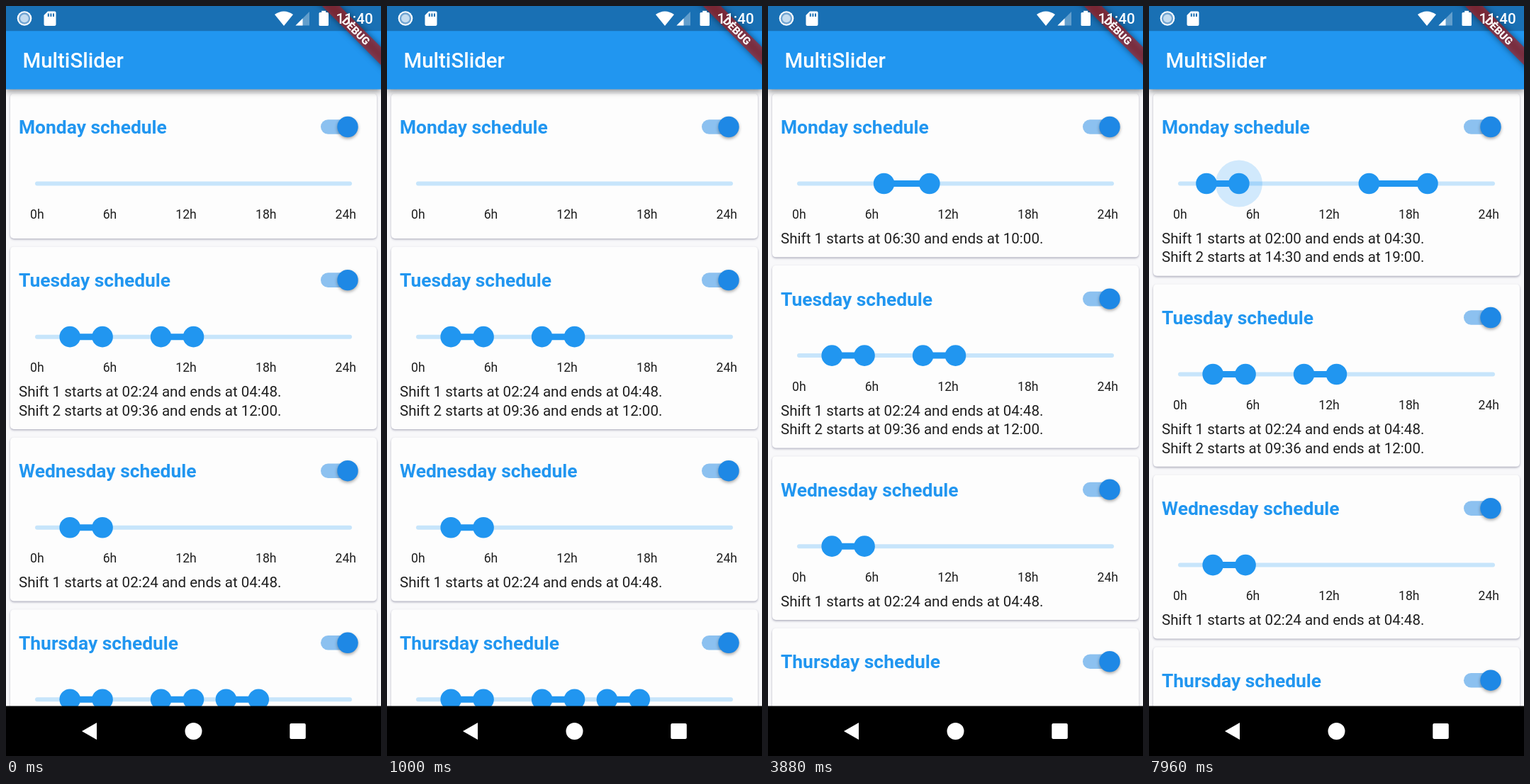
Recreate the animation shown at these times as an HTML page with a canvas. Size 529 px wide and 1058 px high, loop 8000 ms.

```html
<!DOCTYPE html>
<html lang="en">
<head>
<meta charset="utf-8">
<title>MultiSlider</title>
<style>
html, body { margin: 0; width: 100%; height: 100%; overflow: hidden; background: #fafafa; }
canvas { display: block; }
</style>
</head>
<body>
<canvas width="529" height="1058"></canvas>
<script>
const W = 529, LOOP = 8000;
const BLUE = '#2196f0', WHITE = '#fff', INK = '#1f1f1f';
const ctx = document.querySelector('canvas').getContext('2d');

const font = (size, weight = 400) => `${weight} ${size}px Roboto, sans-serif`;

function text(str, x, y, size, color, weight) {
  ctx.font = font(size, weight);
  ctx.fillStyle = color;
  ctx.fillText(str, x, y);
}

function rect(x, y, w, h, color, r = 0) {
  ctx.fillStyle = color;
  ctx.beginPath();
  ctx.roundRect(x, y, w, h, r);
  ctx.fill();
}

function circle(x, y, r, color) {
  ctx.fillStyle = color;
  ctx.beginPath();
  ctx.arc(x, y, r, 0, 7);
  ctx.fill();
}

function shape(path, color) {
  ctx.fillStyle = color;
  ctx.fill(new Path2D(path));
}

function shadowed(color, blur, dy, draw) {
  ctx.save();
  ctx.shadowColor = color;
  ctx.shadowBlur = blur;
  ctx.shadowOffsetY = dy;
  draw();
  ctx.restore();
}

// Each drag: which thumb moves, from when to when, how long it is held, and its hour stops.
const DRAGS = [
  { thumb: 1, press: 1900, release: 3450, stops: [[2000, 9], [2560, 14.5], [2680, 14.5], [3250, 10]] },
  { thumb: 0, press: 4080, release: 4950, stops: [[4180, 6.5], [4800, 2]] },
  { thumb: 2, press: 6000, release: 6850, stops: [[6100, 16.5], [6700, 14.5]] },
  { thumb: 1, press: 7150, release: 8001, stops: [[7250, 10], [7930, 4.5]] }
];
const ADDED = [[1450, 6.5, 9], [5260, 16.5, 19]];

const snap = h => Math.round(h * 2) / 2;

function along(stops, t) {
  let value = stops[0][1];
  for (let i = 1; i < stops.length; i++) {
    const [t0, a] = stops[i - 1], [t1, b] = stops[i];
    const p = Math.min(1, Math.max(0, (t - t0) / (t1 - t0)));
    value += (b - a) * p * p * (3 - 2 * p);
  }
  return snap(value);
}

function mondayAt(t) {
  const hours = ADDED.filter(a => t >= a[0]).flatMap(a => a.slice(1));
  let held = -1;
  for (const d of DRAGS) {
    if (t < d.press) break;
    hours[d.thumb] = along(d.stops, t);
    if (t < d.release) held = d.thumb;
  }
  return { hours, held };
}

const hourX = h => 44.3 + 18.35 * snap(h);

function clock(h) {
  const m = Math.round(h * 60);
  return [Math.floor(m / 60), m % 60].map(n => String(n).padStart(2, '0')).join(':');
}

function slider(hours, held, y) {
  rect(41, y - 3, 447, 6, '#c7e5fb', 3);
  for (let i = 0; i < hours.length; i += 2) {
    const x = hourX(hours[i]);
    rect(x, y - 4.5, hourX(hours[i + 1]) - x, 9, BLUE);
  }
  hours.forEach((h, i) => {
    if (i === held) circle(hourX(h), y, 33, 'rgba(33,150,243,.2)');
    circle(hourX(h), y, 14.8, BLUE);
  });
}

function toggle(y) {
  rect(444, y - 10.3, 48, 20.6, '#8cc1f0', 10.3);
  shadowed('rgba(0,0,0,.35)', 4, 2, () => circle(482, y, 14.7, '#1e88e5'));
}

function card(day, hours, held, top) {
  const height = 204.4 + hours.length / 2 * 26.45;
  shadowed('rgba(30,30,70,.35)', 3, 1.4, () => rect(6, top, 517, height, '#fdfdfd', 5));
  text(day + ' schedule', 18, top + 56.5, 26.4, BLUE, 700);
  toggle(top + 47);
  slider(hours, held, top + 127);
  [['0h', 34], ['6h', 136.7], ['12h', 239.3], ['18h', 352], ['24h', 464.5]]
    .forEach(([label, x]) => text(label, x, top + 176.5, 17.63, INK));
  for (let i = 0; i < hours.length; i += 2)
    text(`Shift ${i / 2 + 1} starts at ${clock(hours[i])} and ends at ${clock(hours[i + 1])}.`,
      18, top + 211.5 + i / 2 * 26.45, 20.57, INK);
  return top + height + 11.75;
}

function banner() {
  ctx.save();
  ctx.translate(W, 0);
  ctx.rotate(Math.PI / 4);
  ctx.filter = 'blur(5px)';
  rect(-70, 41.1, 140, 17.7, 'rgba(0,0,0,.5)');
  ctx.filter = 'none';
  rect(-70, 41.1, 140, 17.7, 'rgba(183,28,28,.627)');
  ctx.textAlign = 'center';
  text('DEBUG', 0, 55.3, 15, WHITE, 900);
  ctx.restore();
}

function statusIcons() {
  circle(26, 17.5, 10.3, WHITE);
  circle(26, 17.5, 8.2, '#72a5d2');
  circle(26, 17.5, 5.8, '#c4dcf0');
  shape('M59 7.5H68.5Q70.5 7.5 70.5 9.5V26Q70.5 28 68.5 28H55.5Q53.5 28 53.5 26V13Z', WHITE);
  [58.8, 62.4, 66].forEach(x => rect(x, 10.5, 2, 4.5, '#1970b4'));
  shape('M379 12Q392 3 405 12L392 28Z', WHITE);
  shape('M428 8V27.5H408.5Z', 'rgba(255,255,255,.32)');
  shape('M418.5 17.5V27.5H408.5Z', WHITE);
  rect(441.5, 9, 13.5, 19, WHITE, 1.5);
  rect(445.2, 6.8, 6, 3, WHITE);
  text('11:40', 465.5, 25, 20.57, WHITE, 500);
}

function navBar() {
  rect(0, 987.5, W, 71, '#000');
  shape('M107 1023L128 1011V1035Z', WHITE);
  circle(264.5, 1023, 12, WHITE);
  rect(400.3, 1012, 22.5, 22, WHITE, 2);
}

function draw(t) {
  rect(0, 0, W, 1058, '#f8f8fa');
  const { hours, held } = mondayAt(t);
  let top = card('Monday', hours, held, 123.5);
  top = card('Tuesday', [2.4, 4.8, 9.6, 12], -1, top);
  top = card('Wednesday', [2.4, 4.8], -1, top);
  card('Thursday', [2.4, 4.8, 9.6, 12, 14.4, 16.8], -1, top);

  shadowed('rgba(0,0,0,.4)', 8, 3, () => rect(0, 0, W, 117.5, BLUE));
  rect(0, 0, W, 35.3, '#1970b4');
  text('MultiSlider', 23.5, 87.3, 29.4, WHITE, 500);
  banner();
  statusIcons();
  navBar();
}

const start = performance.now();
function tick() {
  draw((performance.now() - start) % LOOP);
  requestAnimationFrame(tick);
}
tick();
</script>
</body>
</html>
```
